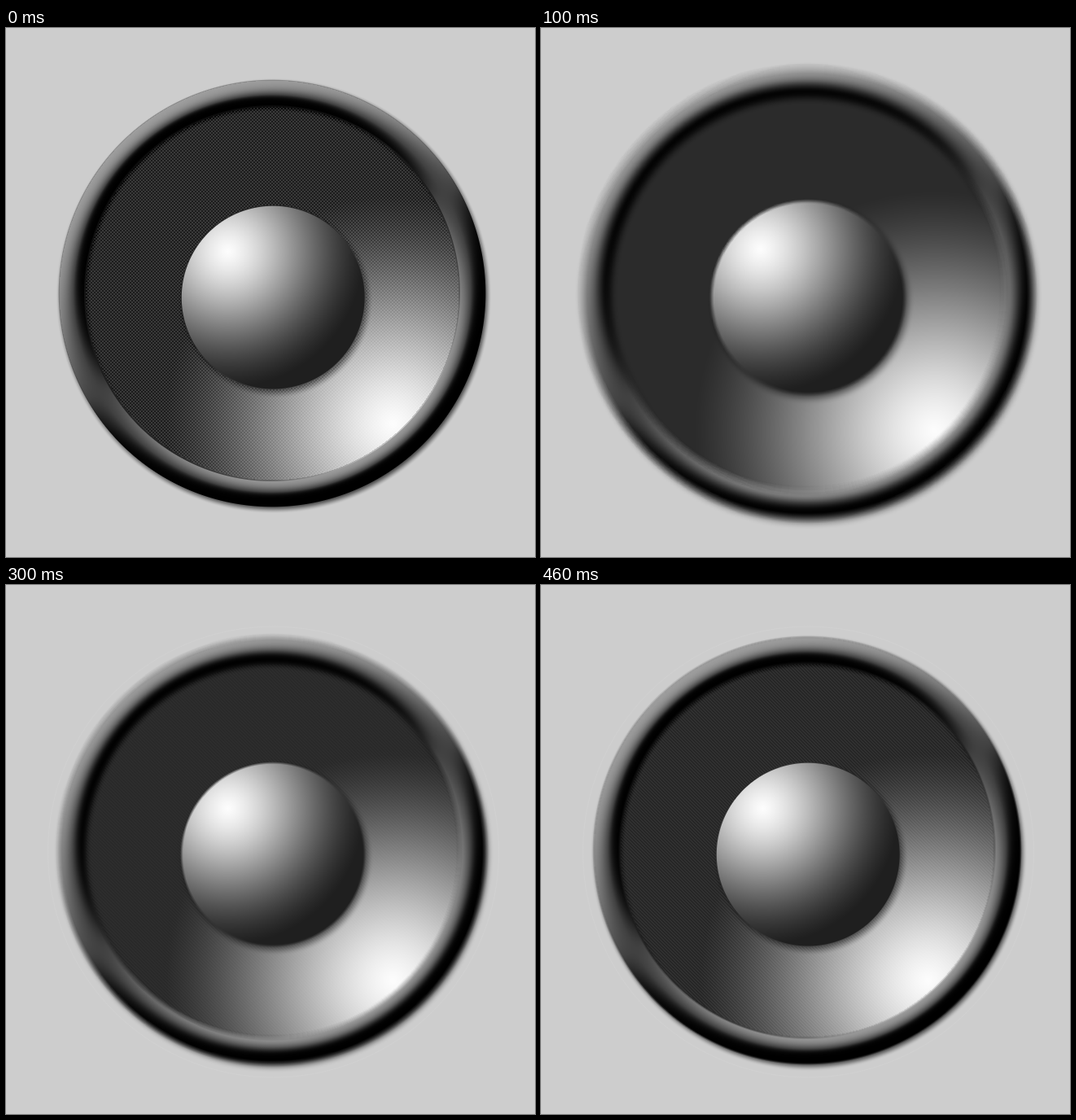
Animation of 650 by 650 pixels, one loop 0.5 s. Source, as an HTML page with a canvas:

```html
<!DOCTYPE html>
<html lang="en">
<head>
<meta charset="utf-8">
<title>Pulsing speaker</title>
<style>
html, body { margin: 0; width: 100%; height: 100%; overflow: hidden; background: #cdcdcd; }
canvas { display: block; }
</style>
</head>
<body>
<canvas id="stage" width="650" height="650"></canvas>
<script>
const SIZE = 650, STEP = 100, BACK = 205;
const CX = 326.5, CY = 325.5, RIM = 262.3, CONE = 231;
const DOME = { x: 327.7, y: 330.6, r: 112.4 };
const LIGHT = { x: -0.5, y: -0.866 };

const clamp = (v, a = 0, b = 1) => Math.min(b, Math.max(a, v));
const mix = (a, b, t) => a + (b - a) * t;
const ease = t => { t = clamp(t); return t * t * (3 - 2 * t); };
const edge = (r, limit) => clamp(r - limit + 0.5);

// Radial highlight fading from white to a floor tone.
function glow(x, y, cx, cy, reach, floor) {
  const t = clamp(Math.hypot(x - cx, y - cy) / reach);
  return mix(253, floor, mix(t, ease(t), 0.5));
}

function shadow(x, y, cx, cy, r, blur, depth) {
  const d = Math.hypot(x - cx, y - cy);
  return 1 - depth * (1 - ease((d - r + blur / 2) / blur));
}

function coneTone(x, y, r, facing) {
  const dark = 0.7 * ease((r - 223) / 8) * clamp(facing + 0.2);
  const line = r > CONE - 1.5 ? 0.82 : 1;
  return glow(x, y, 475, 486, 279, 43) * (1 - dark) * line
    * shadow(x, y, DOME.x + 3, DOME.y + 4, DOME.r, 16, 0.6);
}

// Rounded ring: lit on the slopes that face the light.
function rimTone(r, facing) {
  const slope = 4 * facing * ((r - CONE) / (RIM - CONE) - 0.42);
  const v = slope > 0 ? 65 + 95 * Math.tanh(slope) : 65 * (1 + Math.tanh(2.5 * slope));
  return v * (r > RIM - 1 ? 0.88 : 1);
}

function shade(x, y) {
  const dx = x - CX, dy = y - CY, r = Math.hypot(dx, dy) || 1;
  const facing = (dx * LIGHT.x + dy * LIGHT.y) / r;
  let v = BACK;
  if (r > RIM - 1) v *= shadow(x, y, CX + 2, CY + 3, RIM, 11, 0.7);
  if (r < RIM + 1) v = mix(rimTone(r, facing), v, edge(r, RIM));
  if (r < CONE + 1) v = mix(coneTone(x, y, r, facing), v, edge(r, CONE));
  const d = Math.hypot(x - DOME.x, y - DOME.y);
  if (d < DOME.r + 1) v = mix(glow(x, y, 272, 274, 167, 31), v, edge(d, DOME.r));
  return v;
}

function drawSpeaker() {
  const tones = new Float32Array(SIZE * SIZE);
  for (let y = 0, i = 0; y < SIZE; y++) {
    for (let x = 0; x < SIZE; x++) tones[i++] = shade(x, y);
  }
  return tones;
}

const checker = (x, y) => ((x >> 1) + (y >> 1)) % 2 ? 1 : -1;
const diagonal = (x, y) => (x - y) & 2 ? 1 : -1;

function onCone(x, y, scale) {
  return Math.hypot(x - CX, y - CY) < (CONE - 2) * scale
    && Math.hypot(x - DOME.x, y - DOME.y) > (DOME.r + 1) * scale;
}

// Averages the speaker over a range of zooms, then adds the mesh.
function drawPose(tones, { from, to, depth = 0, weave, halo }) {
  const c = document.createElement('canvas');
  c.width = c.height = SIZE;
  const g = c.getContext('2d');
  const img = g.createImageData(SIZE, SIZE);
  const count = from === to ? 1 : 14;
  const zooms = Array.from({ length: count }, (_, i) => 1 / mix(from, to, (i + 0.5) / count));
  const at = (v, mid, zoom) => clamp(Math.round(mid + (v - mid) * zoom), 0, SIZE - 1);

  for (let y = 0, i = 0; y < SIZE; y++) {
    for (let x = 0; x < SIZE; x++, i += 4) {
      let v = 0;
      for (const zoom of zooms) v += tones[at(y, CY, zoom) * SIZE + at(x, CX, zoom)];
      v /= count;
      if (depth && onCone(x, y, (from + to) / 2)) v += weave(x, y) * depth * (1 - v / 255);
      img.data[i] = img.data[i + 1] = img.data[i + 2] = v;
      img.data[i + 3] = 255;
    }
  }
  g.putImageData(img, 0, 0);

  if (halo) {
    g.strokeStyle = 'rgba(255,255,255,0.08)';
    g.beginPath();
    g.arc(328.5, 328, 277, 0, Math.PI * 2);
    g.stroke();
  }
  return c;
}

const speaker = drawSpeaker();
const poses = [
  { from: 1, to: 1, depth: 18, weave: checker },
  { from: 1.03, to: 1.08 },
  { from: 1.01, to: 1.042, depth: 2, weave: checker },
  { from: 0.985, to: 1.015, depth: 3, weave: diagonal, halo: true },
  { from: 0.996, to: 1.006, depth: 7, weave: diagonal, halo: true }
].map(pose => drawPose(speaker, pose));

const stage = document.getElementById('stage').getContext('2d');

function render(time) {
  stage.drawImage(poses[Math.floor(time / STEP) % poses.length], 0, 0);
}

function tick(now) {
  render(Math.max(0, now));
  requestAnimationFrame(tick);
}

render(0);
requestAnimationFrame(tick);
</script>
</body>
</html>
```
